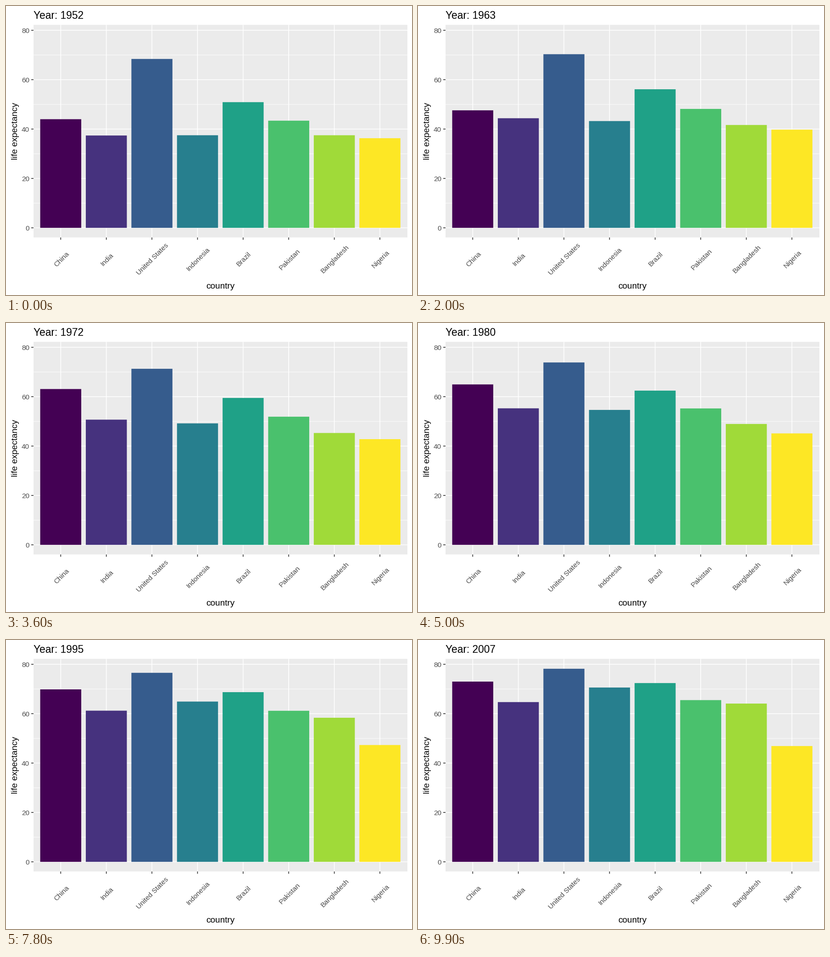
A matplotlib script that plays this animation: 885 by 632 pixels, repeating every 10 s.

```python
import matplotlib.pyplot as plt
import numpy as np
from matplotlib.animation import FuncAnimation
from matplotlib.patches import Rectangle

W, H, DPI = 885, 632, 100
FRAMES, STEP = 100, 9            # nine frames per five years
LEFT, TOP, RIGHT, BOTTOM = 60, 41.3, 875, 506.2
ZERO, UNIT = 485.15, 5.4         # y of value 0, pixels per unit
FIRST, PITCH = 119.3, 99.39      # first bar centre, bar spacing
BAR = 0.9 * PITCH
MAJOR, MINOR = 1.6, 0.9
TICK, LABEL = "#333333", "#4D4D4D"

# Key values; the bars move at constant speed between them.
KEYS = [1952, 1962, 1972, 1982, 1997, 2007]
LIFE = {
    "China": [44.0, 44.5, 63.1, 65.5, 70.4, 73.0],
    "India": [37.4, 43.6, 50.7, 56.6, 61.8, 64.7],
    "United States": [68.4, 70.2, 71.3, 74.6, 76.8, 78.2],
    "Indonesia": [37.5, 42.5, 49.2, 56.2, 66.0, 70.6],
    "Brazil": [50.9, 55.7, 59.5, 63.3, 69.4, 72.4],
    "Pakistan": [43.4, 47.7, 51.9, 56.2, 61.8, 65.5],
    "Bangladesh": [37.5, 41.2, 45.3, 50.0, 59.4, 64.1],
    "Nigeria": [36.3, 39.4, 42.8, 45.8, 47.5, 46.9],
}
EXTRA = {"China": {1957: 50.5, 1967: 58.4}}   # rise, dip and recovery

plt.rcParams["font.family"] = "Liberation Sans"
fig = plt.figure(figsize=(W / DPI, H / DPI), dpi=DPI, facecolor="white")
ax = fig.add_axes([0, 0, 1, 1])
ax.set(xlim=(0, W), ylim=(H, 0))
ax.axis("off")


def box(x0, y0, x1, y1, color, z=1):
    return ax.add_patch(Rectangle((x0, y0), x1 - x0, y1 - y0, snap=False,
                                  facecolor=color, linewidth=0, zorder=z))


def hline(y, x0, x1, width, color="white"):
    box(x0, y - width / 2, x1, y + width / 2, color)


def vline(x, y0, y1, width, color="white"):
    box(x - width / 2, y0, x + width / 2, y1, color)


def label(x, y, text, px, color="black", **kw):
    return ax.text(x, y, text, fontsize=px * 72 / DPI, color=color,
                   va="baseline", rotation_mode="anchor", **kw)


def value_y(v):
    return ZERO - UNIT * v


def key_points(name):
    points = dict(zip(KEYS, LIFE[name])) | EXTRA.get(name, {})
    return np.array(sorted(points.items())).T


box(LEFT, TOP, RIGHT, BOTTOM, "#EBEBEB", 0)

for v in range(10, 80, 20):
    hline(value_y(v), LEFT, RIGHT, MINOR)

for v in range(0, 81, 20):
    y = value_y(v)
    hline(y, LEFT, RIGHT, MAJOR)
    hline(y, LEFT - 5, LEFT, MAJOR, TICK)
    label(51, y + 5.9, str(v), 15.3, LABEL, ha="right")

bars = []
for i, name in enumerate(LIFE):
    x = FIRST + i * PITCH
    color = plt.cm.viridis(i / (len(LIFE) - 1))
    vline(x, TOP, BOTTOM, MAJOR)
    vline(x, BOTTOM, BOTTOM + 5, MAJOR, TICK)
    label(x + 4.7, 556.9, name, 15.3, LABEL, ha="center", rotation=45)
    bar = box(x - BAR / 2, ZERO, x + BAR / 2, ZERO, color, 2)
    bars.append((bar, *key_points(name)))

label(467.5, 618, "country", 19, ha="center")
label(25, 273.8, "life expectancy", 19, ha="center", rotation=90)
title = label(60, 28, "", 22.7, ha="left")


def update(frame):
    year = KEYS[0] + 5 * frame / STEP
    for bar, years, values in bars:
        top = value_y(np.interp(year, years, values))
        bar.set_y(top)
        bar.set_height(ZERO - top)
    title.set_text(f"Year: {round(year)}")


anim = FuncAnimation(fig, update, frames=FRAMES, interval=100,
                     repeat=True, repeat_delay=0)
plt.show()
```
